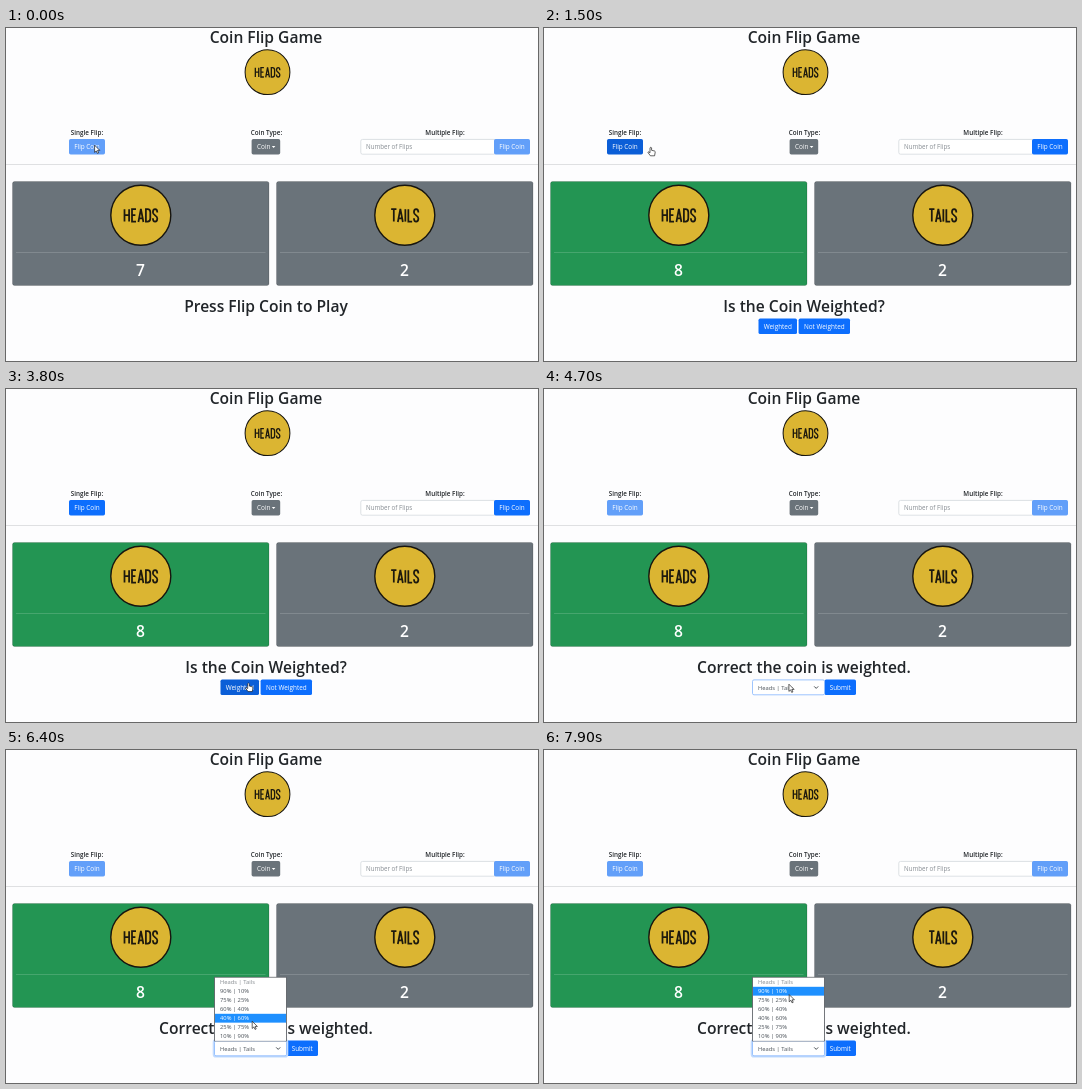
These frames come from a looping animation (532x333 px, 8 s). An HTML page:

```html
<!DOCTYPE html>
<html lang="en">
<head>
<meta charset="utf-8">
<title>Coin Flip Game</title>
<style>
  html, body { margin: 0; width: 100%; height: 100%; overflow: hidden; background: #fdfdfe; }
  svg { display: block; width: 532px; height: 333px; font: 6.4px "Open Sans", "Noto Sans", sans-serif; }
  text { fill: #212529; }
  .mid { text-anchor: middle; }
  .big { font-size: 15.6px; font-weight: 600; }
  .label { font-size: 6.3px; font-weight: 600; }
  .light { fill: #fff; }
  .small { font-size: 5.8px; }
</style>
</head>
<body>
<svg id="stage" viewBox="0 0 532 333"></svg>
<script>
const NS = "http://www.w3.org/2000/svg";
const stage = document.getElementById("stage");
const LOOP = 8000, STEP = 100, FADE = 150;
const REVEAL = 850, LEAVE = 1450, HOVER = 3050, ANSWER = 4550, OPEN = 5150;
const BLUE = [13, 110, 253], DARK = [11, 94, 215], PALE = [98, 159, 249];
const GREY = "#6a737a", GREEN = "#239553";

function add(parent, tag, attrs, text) {
  const el = document.createElementNS(NS, tag);
  for (const key in attrs) el.setAttribute(key, attrs[key]);
  if (text !== undefined) el.textContent = text;
  parent.appendChild(el);
  return el;
}
const group = (parent = stage) => add(parent, "g", {});
const rect = (parent, x, y, width, height, fill, rx = 0) =>
  add(parent, "rect", { x, y, width, height, fill, rx });
const label = (parent, x, y, text, cls) => add(parent, "text", { x, y, class: cls }, text);
const path = (parent, d, attrs) => add(parent, "path", { d, fill: "none", ...attrs });

function button(parent, x, width, y, text, fill = "rgb(13,110,253)") {
  const box = rect(parent, x, y, width, 15.5, fill, 1.7);
  label(parent, x + width / 2, y + 10.1, text, "mid light");
  return box;
}

// Narrow coin lettering: [stroke path, advance]
const GLYPHS = {
  H: ["M0 0V12.4M4.6 0V12.4M0 6H4.6", 7.5],
  E: ["M4 0H0V12.4H4M0 6H3.4", 6.4],
  A: ["M0 12.8L2.5 -.3L5 12.8M.8 9.2H4.2", 7.5],
  D: ["M0 0H1.6Q4.4 0 4.4 3V9.4Q4.4 12.4 1.6 12.4H0Z", 7],
  S: ["M4.4 3.4Q4.4 0 2.2 0T0 3Q0 4.7 2.2 6.2T4.4 9.4Q4.4 12.4 2.2 12.4T0 9", 4.8],
  T: ["M-.3 0H5M2.35 0V12.4", 6.4],
  I: ["M0 0V12.4", 3],
  L: ["M0 0V12.4H3.8", 5.6]
};
function coin(cx, cy, r, word) {
  const g = add(stage, "g", { transform: `translate(${cx} ${cy}) scale(${r / 30})` });
  add(g, "circle", { r: 30, fill: "#dbb532", stroke: "#17150f", "stroke-width": 1.4 });
  const width = [...word].reduce((sum, c) => sum + GLYPHS[c][1], 0);
  let x = -width / 2 + .3;
  for (const c of word) {
    path(g, GLYPHS[c][0], { transform: `translate(${x} -6)`, stroke: "#1d190e", "stroke-width": 1.75 });
    x += GLYPHS[c][1];
  }
}
function card(x, word, count) {
  const box = add(stage, "rect", { x, y: 153.5, width: 256.5, height: 104, rx: 2, fill: GREY,
    stroke: "#000", "stroke-opacity": .15 });
  path(stage, `M${x + 3.5} 224.5h249.5`, { stroke: "#fff", "stroke-opacity": .2, "stroke-width": .8 });
  coin(x + 128.3, 187.2, 30, word);
  return { box, count: label(stage, x + 128, 247.7, count, "big mid light") };
}

// Page
label(stage, 260, 14.8, "Coin Flip Game", "big mid");
coin(261.5, 44.2, 22.4, "HEADS");
label(stage, 81, 106.6, "Single Flip:", "label mid");
label(stage, 260.5, 106.6, "Coin Type:", "label mid");
label(stage, 439, 106.6, "Multiple Flip:", "label mid");
const single = button(stage, 63, 36, 111, "Flip Coin");
rect(stage, 245.6, 111, 28.6, 15.5, GREY, 1.7);
label(stage, 251, 121.1, "Coin", "light");
path(stage, "M265.8 118h3.6l-1.8 1.9z", { style: "fill:#fff" });
add(stage, "rect", { x: 354.8, y: 111.4, width: 135, height: 14.8, rx: 1.7, fill: "#fff",
  stroke: "#ced4da", "stroke-width": .7 });
add(stage, "text", { x: 360, y: 121.1, style: "fill:#868c92;font-size:6.2px" }, "Number of Flips");
const multiple = button(stage, 488, 36, 111, "Flip Coin");
rect(stage, 0, 136, 532, 1, "#dfe0e2");
const heads = card(6.5, "HEADS", "7");
card(270.5, "TAILS", "2");
const headline = label(stage, 260, 284.3, "", "big mid");

// Question buttons
const question = group();
const weighted = button(question, 214.5, 38.5, 290.6, "Weighted");
button(question, 254.6, 51.4, 290.6, "Not Weighted");

// Answer form
const form = group();
button(form, 280.5, 31.5, 290.6, "Submit");
const ring = add(form, "rect", { x: 207.8, y: 290.2, width: 73.4, height: 16.3, rx: 2, fill: "none",
  stroke: "#c2dbfe", "stroke-width": 2.2 });
add(form, "rect", { x: 208.5, y: 290.9, width: 72, height: 14.9, rx: 1.5, fill: "#fff",
  stroke: "#86b7fe", "stroke-width": .8 });
label(form, 214, 300.6, "Heads | Tails", "small").style.fill = "#495057";
path(form, "M270.2 297.4l2 2l2-2", { stroke: "#343a40", "stroke-width": .9 });

// Open list
const list = group();
add(list, "rect", { x: 208.6, y: 227.3, width: 71.8, height: 63.6, fill: "#fff",
  stroke: "#5c6066", "stroke-width": .9 });
const options = ["Heads | Tails", "90% | 10%", "75% | 25%", "60% | 40%", "40% | 60%", "25% | 75%", "10% | 90%"]
  .map((text, i) => {
    const y = 227.8 + i * 9;
    return { bar: rect(list, 209, y, 71, 9, "#fff"), text: label(list, 214, y + 6.5, text, "small") };
  });

// Pointers, both with the tip at 0,0
const pointer = group();
const outline = { style: "fill:#fff", stroke: "#111", "stroke-width": .65, "stroke-linejoin": "round" };
const arrow = path(pointer, "M0 0V7.2L1.7 5.7L2.8 8.2L4 7.7L2.9 5.2H5.2Z", outline);
const hand = path(pointer,
  "M-.8 .6Q0 -.5 .8 .6V3.1L3.8 3.8Q4.5 4.1 4.4 5L3.8 8.6H-.4L-2.8 5.4Q-2.7 4.2 -1.8 4.7L-.8 5.6Z", outline);

// Pointer route: time, x, y
const ROUTE = [
  [0, 88.6, 117.2], [300, 88.6, 117.2], [700, 87.3, 117.4], [1400, 87.6, 117.6], [1500, 106.8, 119.2],
  [1900, 118, 135], [2400, 142, 188], [2900, 212, 272], [3200, 234, 293], [3600, 242.5, 294],
  [4500, 242.5, 294], [5000, 248.5, 297], [5900, 248.5, 297], [6200, 247, 277], [6300, 247, 277],
  [6700, 243.8, 254], [7200, 244.2, 252], [7300, 244.4, 249], [7600, 245.2, 244.6], [8000, 245.2, 244.6]
];
function pointerAt(t) {
  const i = Math.max(1, ROUTE.findIndex(p => p[0] >= t));
  const [t0, x0, y0] = ROUTE[i - 1], [t1, x1, y1] = ROUTE[i];
  const k = (t - t0) / (t1 - t0);
  return [x0 + (x1 - x0) * k, y0 + (y1 - y0) * k];
}

// Colour at time t from [start, colour] steps, each faded in
function fade(t, steps) {
  let color = steps[0][1];
  for (const [start, next] of steps.slice(1)) {
    const k = Math.min(1, Math.max(0, (t - start) / FADE));
    color = color.map((c, i) => c + (next[i] - c) * k);
  }
  return `rgb(${color.map(Math.round)})`;
}
const show = (el, on) => el.setAttribute("visibility", on ? "inherit" : "hidden");

function draw(t) {
  const asked = t >= REVEAL, answered = t >= ANSWER;
  single.setAttribute("fill", fade(t, [[0, PALE], [REVEAL, DARK], [LEAVE + 50, BLUE], [ANSWER, PALE]]));
  multiple.setAttribute("fill", fade(t, [[0, PALE], [REVEAL, BLUE], [ANSWER, PALE]]));
  weighted.setAttribute("fill", fade(t, [[0, BLUE], [HOVER, DARK]]));
  heads.box.setAttribute("fill", asked ? GREEN : GREY);
  heads.count.textContent = asked ? "8" : "7";
  headline.textContent = answered ? "Correct the coin is weighted."
    : asked ? "Is the Coin Weighted?" : "Press Flip Coin to Play";
  show(question, asked && !answered);
  show(form, answered);
  show(ring, t >= OPEN);
  show(list, t >= OPEN);

  const [x, y] = pointerAt(t);
  const row = y < 290 ? Math.floor((y - 227.8) / 9) : 0;
  options.forEach(({ bar, text }, i) => {
    const on = i === row;
    bar.setAttribute("fill", on ? (i ? "#1e90ff" : "#c6c6c6") : "#fff");
    text.style.fill = on ? "#fff" : i ? "#495057" : "#858a8f";
  });

  const pressing = (asked && t < LEAVE + 100) || (t >= HOVER && !answered);
  show(hand, pressing);
  show(arrow, !pressing);
  pointer.setAttribute("transform", `translate(${x} ${y})`);
}

const begin = performance.now();
function tick() {
  const t = (performance.now() - begin) % LOOP;
  draw(Math.floor(t / STEP) * STEP);
  requestAnimationFrame(tick);
}
tick();
</script>
</body>
</html>
```
